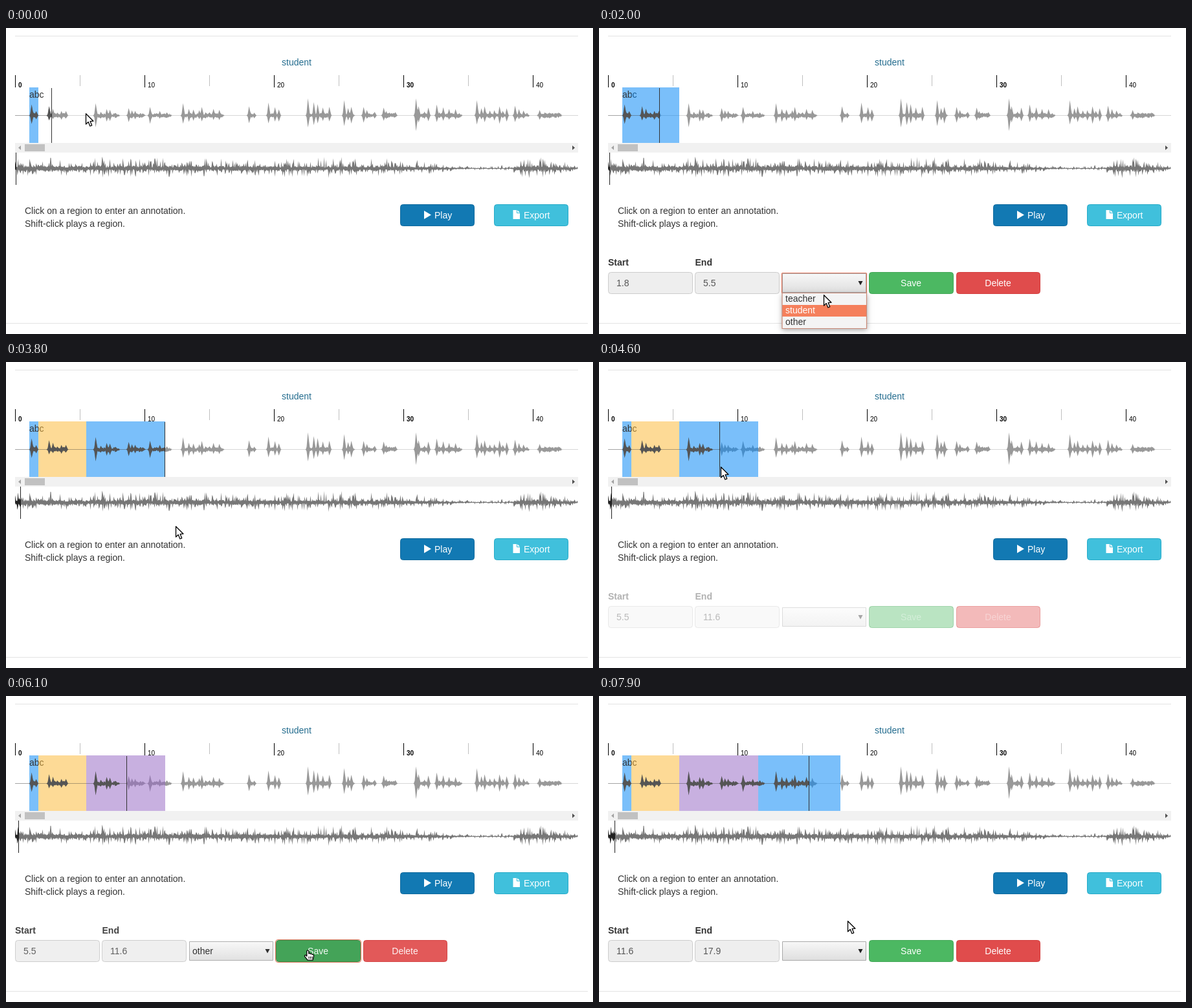
Write an HTML page with a canvas that moves like this. It is 907 by 474 pixels and loops after 8000 ms.

```html
<!DOCTYPE html>
<html lang="en">
<head>
<meta charset="utf-8">
<title>Audio annotation</title>
<style>
html, body { margin: 0; width: 100%; height: 100%; overflow: hidden; background: #fff; }
canvas { display: block; width: 907px; height: 474px; }
</style>
</head>
<body>
<canvas id="stage"></canvas>
<script>
const W = 907, H = 474, LOOP = 8000, STEP = 100;
const LEFT = 14, RIGHT = 884, PX_PER_SEC = 20;
const FADE = 400, LAG = 70;
const FONT = '"Liberation Sans", Arial, sans-serif';
const canvas = document.getElementById('stage');
const dpr = window.devicePixelRatio || 1;
canvas.width = W * dpr;
canvas.height = H * dpr;
const c = canvas.getContext('2d');

const BLUE = 'rgba(0,133,246,.52)';
const ORANGE = 'rgba(252,185,54,.52)';
const PURPLE = 'rgba(150,104,196,.52)';
const OPTIONS = ['teacher', 'student', 'other'];

// ---------- story ----------
// Each region is born, clicked at "head", given an option and saved.
const REGIONS = [
  { from: 50, to: 124, born: 400, stray: [170, 148], click: 1300, head: 93,
    pick: 2200, choice: 1, saveAt: [442, 397], save: 2900, color: ORANGE },
  { from: 124, to: 246, born: 3500, stray: [271, 315], click: 4500, head: 186,
    pick: 5700, choice: 2, saveAt: [466, 394], save: 6100, color: PURPLE },
  { from: 246, to: 373, born: 6600, stray: [402, 198], click: 7500, head: 324,
    pick: Infinity, choice: 0, saveAt: [466, 394], save: Infinity }
];

const clamp01 = v => Math.min(1, Math.max(0, v));
const mix = (a, b, k) => a + (b - a) * k;
const swing = p => .5 - Math.cos(clamp01(p) * Math.PI) / 2;
const seconds = x => String(+((x - LEFT) / PX_PER_SEC).toFixed(1));
const optionSpot = i => [347, 413 + 21 * i];
const edgeSpot = r => [r.to - 1, 132];

// pointer moves: start, end, target
const moves = REGIONS.flatMap((r, i) => {
  const { born, click, pick, save } = r, next = REGIONS[i + 1];
  const list = [
    [born + 100, born + 400, r.stray],
    [click - 500, click - 200, [r.head + 2, 162]],
    [click + 100, click + 400, [384, 348]],
    [click + 400, click + 700, optionSpot(0)],
    [click + 700, click + 900, optionSpot(r.choice)],
    [pick, pick + 300, r.saveAt]
  ];
  if (next) list.push([save, next.born - 100, edgeSpot(next)]);
  return list;
});

function pointerAt(t) {
  let [x, y] = edgeSpot(REGIONS[0]);
  for (const [start, end, to] of moves) {
    if (t < start) break;
    const k = clamp01((t - start) / (end - start));
    x = mix(x, to[0], k);
    y = mix(y, to[1], k);
  }
  return { x, y };
}

function playheadAt(t) {
  let x = 70;
  for (const r of REGIONS) {
    if (t >= r.born) x = r.to - 1;
    if (t >= r.click) x = r.head;
  }
  return x;
}

// ---------- waveforms ----------
function seeded(s) {
  return () => {
    s = (s * 16807) % 2147483647;
    return s / 2147483647;
  };
}

// where a phrase starts and ends, and how loud it is
const PHRASES = [
  [36, 48, 18], [63, 94, 15], [135, 175, 20], [186, 214, 12], [219, 255, 14], [270, 336, 20],
  [372, 384, 15], [402, 423, 21], [463, 502, 28], [519, 538, 25], [549, 571, 14], [580, 604, 13],
  [630, 654, 28], [662, 704, 18], [724, 776, 25], [783, 808, 16], [821, 858, 9]
];
// loudness of the whole recording along its length
const LOUDNESS = [[14, 1], [560, 1], [640, .7], [730, .2], [780, .3], [795, 1.3], [850, 1], [884, .2]];

function outline(up, down, mid) {
  const path = new Path2D();
  path.moveTo(LEFT, mid);
  up.forEach((h, i) => path.lineTo(LEFT + .5 + i, mid - h));
  for (let i = down.length - 1; i >= 0; i--) path.lineTo(LEFT + .5 + i, mid + down[i]);
  path.closePath();
  return path;
}

function speechPath() {
  const rnd = seeded(71), size = RIGHT - LEFT;
  const up = Array(size).fill(0), down = Array(size).fill(0);
  const put = (x, u, d) => {
    const i = Math.round(x) - LEFT;
    up[i] = Math.max(up[i], u);
    down[i] = Math.max(down[i], d);
  };
  for (const [from, to, loud] of PHRASES) {
    for (let x = from; x <= to; x++) {
      const edge = Math.min(1, (x - from + 1) / 3, (to - x + 1) / 4);
      put(x, edge * (1 + rnd() * 3), edge * (1 + rnd() * 3));
    }
    for (let x = from + 3, first = true; x < to - 1; x += 4 + rnd() * 6, first = false) {
      const fall = 1 - .55 * (x - from) / (to - from);
      const u = loud * (first ? .95 : fall * (.3 + rnd() * .7));
      const d = u * (.5 + rnd() * .5);
      for (let k = -2; k <= 3; k++) {
        const part = Math.max(0, k < 0 ? 1 + k * .42 : 1 - k * .3);
        put(x + k, u * part, d * part);
      }
    }
  }
  return outline(up, down, 135.5);
}

function loudnessAt(x) {
  const i = LOUDNESS.findIndex(p => p[0] > x);
  const [a, b] = [LOUDNESS[i - 1], LOUDNESS[i]];
  return mix(a[1], b[1], (x - a[0]) / (b[0] - a[0]));
}

function overviewPath() {
  const rnd = seeded(4021), up = [], down = [];
  const level = tall => 1 + rnd() * 3 + rnd() ** 5 * tall;
  for (let x = LEFT; x < RIGHT; x++) {
    const e = loudnessAt(x);
    up.push(e * level(15));
    down.push(e * level(11));
  }
  return outline(up, down, 217.5);
}

const speech = speechPath(), overview = overviewPath();

// ---------- drawing helpers ----------
function rect(x, y, w, h, fill) {
  c.fillStyle = fill;
  c.fillRect(x, y, w, h);
}

function text(s, x, y, color, { size = 14, weight = 'normal', align = 'left' } = {}) {
  c.font = `${weight} ${size}px ${FONT}`;
  c.textAlign = align;
  c.fillStyle = color;
  c.fillText(s, x, y);
}

function poly(points, fill) {
  c.beginPath();
  points.forEach(([x, y]) => c.lineTo(x, y));
  c.closePath();
  c.fillStyle = fill;
  c.fill();
}

function box(x, y, w, h, fill, border, r = 4) {
  c.beginPath();
  c.roundRect(x + .5, y + .5, w - 1, h - 1, r);
  c.fillStyle = fill;
  c.fill();
  c.strokeStyle = border;
  c.lineWidth = 1;
  c.stroke();
}

function frameLine(x, y, w, h, color, r = 0) {
  c.beginPath();
  c.roundRect(x, y, w, h, r);
  c.strokeStyle = color;
  c.lineWidth = 1.2;
  c.stroke();
}

function clipped(x, y, w, h, draw) {
  c.save();
  c.beginPath();
  c.rect(x, y, w, h);
  c.clip();
  draw();
  c.restore();
}

// ---------- parts ----------
function drawRuler() {
  for (let sec = 0; sec <= 40; sec += 5) {
    const x = LEFT + sec * PX_PER_SEC;
    if (sec % 10) {
      rect(x, 73, 1, 17, '#c0c0c0');
    } else {
      rect(x, 73, 1, 19, '#000');
      text(String(sec), x + 5, 92, '#000', { size: 10, weight: sec % 30 ? 'normal' : 'bold' });
    }
  }
}

function drawSpeech(color, line) {
  rect(LEFT, 135, RIGHT - LEFT, 1, line);
  c.fillStyle = color;
  c.fill(speech);
}

function drawOverview(color) {
  c.fillStyle = color;
  c.fill(overview);
}

function drawTrack(t) {
  const head = playheadAt(t);
  drawSpeech('#999', '#d6d6d6');
  rect(36, 92, 14, 86, BLUE);
  text('abc', 36, 108, '#333');
  for (const r of REGIONS) {
    if (t >= r.born) rect(r.from, 92, r.to - r.from, 86, t >= r.save ? r.color : BLUE);
  }
  clipped(LEFT, 93, head - LEFT, 85, () => drawSpeech('#555', 'rgba(85,85,85,.4)'));
  rect(head, 93, 1, 85, '#333');

  rect(LEFT, 178, RIGHT - LEFT, 15, '#f1f1f1');
  rect(29, 180, 31, 11, '#c1c1c1');
  poly([[23, 182], [23, 189], [19, 185.5]], '#a3a3a3');
  poly([[875, 182], [875, 189], [879, 185.5]], '#505050');

  const mini = Math.floor(LEFT + (head - LEFT) * .0348);
  drawOverview('#777');
  clipped(LEFT, 193, mini - LEFT, 50, () => drawOverview('#222'));
  rect(mini, 193, 1, 50, '#222');
}

function drawPage() {
  rect(0, 0, W, H, '#fff');
  rect(LEFT, 12, RIGHT - LEFT, 1, '#e3e3e3');
  rect(0, 457, 899, 1, '#e3e3e3');
  text('student', 449, 58, '#256d8f', { align: 'center' });
  drawRuler();
  text('Click on a region to enter an annotation.', 29, 288, '#333');
  text('Shift-click plays a region.', 29, 308, '#333');

  box(609, 273, 115, 34, '#1279b3', '#0f6a9e');
  poly([[646, 283], [657, 289.5], [646, 296]], '#fff');
  text('Play', 662, 295, '#fff');

  box(754, 273, 115, 34, '#40c0dc', '#26aac8');
  poly([[783.5, 282], [789, 282], [789, 287], [794, 287], [794, 296], [783.5, 296]], '#fff');
  poly([[790, 282], [794, 286], [790, 286]], '#fff');
  text('Export', 800, 295, '#fff');
}

function drawSelect(value, focused) {
  const g = c.createLinearGradient(0, 380, 0, 410);
  g.addColorStop(0, '#f8f8f8');
  g.addColorStop(1, '#dedede');
  box(283, 380, 130, 30, g, '#a9a9a9', 0);
  if (focused) frameLine(282.5, 379.5, 131, 31, '#e0755c', 1);
  text(value, 288, 400, '#222');
  poly([[400.5, 392], [407.5, 392], [404, 398.5]], '#222');
}

function drawOptions(pointer) {
  const active = Math.min(2, Math.max(1, Math.floor((pointer.y - 411) / 18)));
  c.save();
  c.shadowColor = 'rgba(0,0,0,.35)';
  c.shadowBlur = 8;
  c.shadowOffsetY = 2;
  rect(283, 411, 131, 55, '#f4f4f4');
  c.restore();
  OPTIONS.forEach((name, i) => {
    if (i === active) rect(283, 411 + i * 18, 130, 18, '#f5805c');
    text(name, 288, 424 + i * 18, i === active ? '#fff' : '#333');
  });
  frameLine(283, 410.5, 130.5, 55, '#c98a78');
}

const overSave = p => p.x >= 417 && p.x < 548 && p.y >= 378 && p.y < 412;

function drawForm(r, t, pointer) {
  const focus = r.click + 500, open = r.click + 600;
  c.save();
  c.globalAlpha = swing((t - r.click + LAG) / FADE) * (1 - swing((t - r.save + LAG) / FADE));
  text('Start', 14, 368, '#333', { weight: 'bold' });
  text('End', 148.5, 368, '#333', { weight: 'bold' });
  box(14, 378, 131, 34, '#eee', '#ccc');
  box(148, 378, 131, 34, '#eee', '#ccc');
  text(seconds(r.from), 27, 400, '#555');
  text(seconds(r.to), 161, 400, '#555');
  drawSelect(t >= r.pick ? OPTIONS[r.choice] : '', t >= focus && t < r.save);

  const hot = overSave(pointer);
  box(417, 378, 131, 34, hot ? '#359c4b' : '#4cb862', hot ? '#2f8a42' : '#44a858');
  if (t >= r.save) frameLine(416.5, 377.5, 132, 35, '#e0755c', 4);
  text('Save', 482, 400, '#fff', { align: 'center' });
  box(552, 378, 130, 34, '#e04c4c', '#d33f3f');
  text('Delete', 616.5, 400, '#fff', { align: 'center' });
  if (t >= open && t < r.pick) drawOptions(pointer);
  c.restore();
}

function drawArrow() {
  poly([[.5, .8], [.5, 17], [4.2, 13.6], [6.9, 20], [9.7, 18.8], [7.1, 12.6], [12, 12.2]], '#fff');
  c.stroke();
}

function drawHand() {
  c.beginPath();
  c.moveTo(-1.2, 9);
  c.lineTo(-1.2, 1);
  c.quadraticCurveTo(.3, -1.4, 1.8, 1);
  c.lineTo(1.8, 5);
  c.quadraticCurveTo(3.5, 3.8, 4.6, 5.6);
  c.quadraticCurveTo(6.4, 4.6, 7.3, 6.4);
  c.quadraticCurveTo(9.6, 6, 9.6, 8.4);
  c.lineTo(8, 15.2);
  c.lineTo(0, 15.2);
  c.lineTo(-4.6, 9.2);
  c.quadraticCurveTo(-4.6, 6.6, -2.4, 7.6);
  c.closePath();
  c.fill();
  c.stroke();
  for (let i = 0; i < 3; i++) rect(1.6 + i * 2.4, 9.5, 1, 3.5, '#000');
}

function drawPointer({ x, y }, hand) {
  c.save();
  c.translate(Math.round(x), Math.round(y));
  c.lineWidth = 1.3;
  c.lineJoin = 'round';
  c.strokeStyle = '#000';
  c.fillStyle = '#fff';
  if (hand) drawHand();
  else drawArrow();
  c.restore();
}

// ---------- loop ----------
function render(ms) {
  // The screen is refreshed ten times a second.
  const t = Math.floor(ms % LOOP / STEP) * STEP;
  const pointer = pointerAt(t);
  const active = REGIONS.find(r => t >= r.click - LAG && t < r.save - LAG + FADE);
  c.setTransform(dpr, 0, 0, dpr, 0, 0);
  drawPage();
  drawTrack(t);
  if (active) drawForm(active, t, pointer);
  drawPointer(pointer, active && overSave(pointer));
}

const begin = performance.now();
function tick() {
  render(Math.max(0, performance.now() - begin));
  requestAnimationFrame(tick);
}
tick();
</script>
</body>
</html>
```
